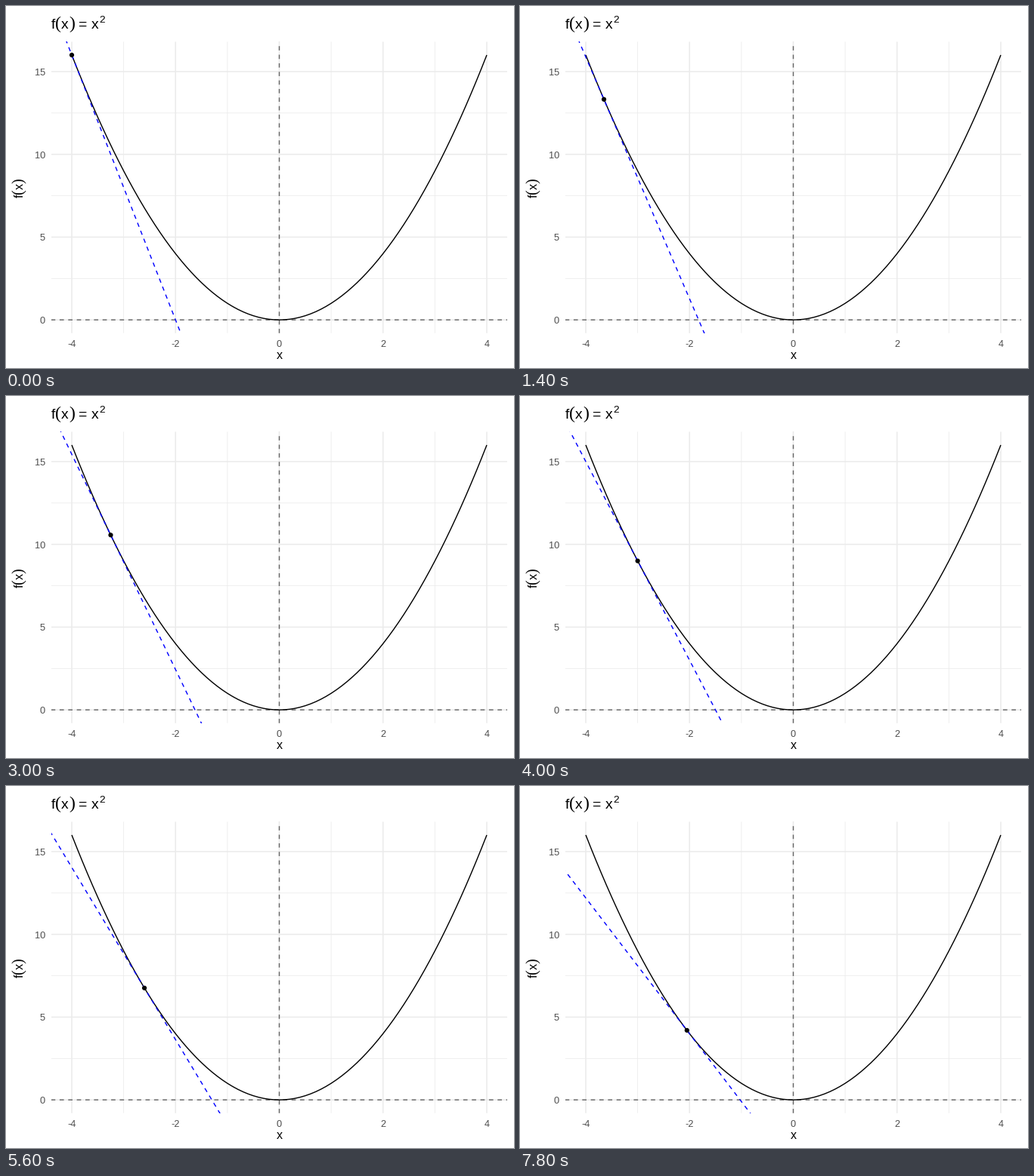
A matplotlib script for the animation above (8000 ms loop, 672 by 480 pixels).

```python
import numpy as np
import matplotlib.pyplot as plt
from matplotlib.animation import FuncAnimation
from matplotlib.patches import Circle, Rectangle

W, H, DPI = 672, 480, 96
PT = 72 / DPI                      # points per pixel
X0, Y0 = 361.5, 416.2              # pixel position of the origin
UX, UY = 68.62, 21.95              # pixels per unit
LINE = 1.42
DASH = (4, 4)

fig = plt.figure(figsize=(W / DPI, H / DPI), dpi=DPI, facecolor="white")
ax = fig.add_axes([0, 0, 1, 1])
ax.set_xlim(0, W)
ax.set_ylim(H, 0)
ax.axis("off")


def px(x):
    return X0 + UX * x


def py(y):
    return Y0 - UY * y


left, right = px(-4.4), px(4.4)
top, bottom = py(16.8), py(-0.8)
panel = Rectangle((left, top), right - left, bottom - top,
                  transform=ax.transData)


def stroke(xs, ys, color, width=LINE, style="-", z=1):
    line, = ax.plot(xs, ys, color=color, lw=width * PT, ls=style, zorder=z,
                    solid_capstyle="butt", dash_capstyle="butt", snap=False)
    line.set_clip_path(panel)
    return line


def label(x, y, s, size, color="black", font="Liberation Sans", **kw):
    kw.setdefault("va", "baseline")
    ax.text(x, y, s, fontsize=size * PT, color=color, family=font, **kw)


# Formula pieces: text, offset, rise and scale in ems, font
SANS, SERIF = "Liberation Sans", "Liberation Serif"
CALL = [("f", 0, 0, 1, SANS), ("(", 0.26, 0, 1.25, SERIF),
        ("x", 0.69, 0, 1, SANS), (")", 1.23, 0, 1.25, SERIF)]
SQUARE = [("=", 1.9, 0, 1, SANS), ("x", 2.79, 0, 1, SANS),
          ("2", 3.34, 0.44, 0.7, SANS)]


def formula(x, y, pieces, size, upright=True):
    for s, along, rise, scale, font in pieces:
        dx, dy = along * size, -rise * size
        if not upright:
            dx, dy = dy, -dx
        label(x + dx, y + dy, s, size * scale, font=font, ha="left",
              rotation=0 if upright else 90, rotation_mode="anchor")


# Grid
GRID = "#ebebeb"
for x in (-3, -1, 1, 3):
    stroke([px(x)] * 2, [bottom, top], GRID, 0.78)
for y in (2.5, 7.5, 12.5):
    stroke([left, right], [py(y)] * 2, GRID, 0.78)
for x in range(-4, 5, 2):
    stroke([px(x)] * 2, [bottom, top], GRID, 1.55)
    label(px(x), 452, str(x), 12.8, "#4d4d4d", ha="center")
for y in range(0, 16, 5):
    stroke([left, right], [py(y)] * 2, GRID, 1.55)
    label(52, py(y) + 5, str(y), 12.8, "#4d4d4d", ha="right")

# Zero lines and parabola
stroke([left, right], [Y0, Y0], "#666666", style=(0, DASH), z=2)
stroke([X0, X0], [bottom, top], "#666666", style=(0, DASH), z=2)
xs = np.linspace(-4, 4, 161)
stroke(px(xs), py(xs ** 2), "black", z=3)

formula(59.6, 30, CALL + SQUARE, 19.2)
formula(23, 254.5, CALL, 16, upright=False)
label(X0, 468, "x", 16, ha="center")

tangent = stroke([], [], "blue", style=(6.66, DASH), z=4)
dot = Circle((0, 0), 3.1, color="black", lw=0, zorder=5)
ax.add_patch(dot)


def update(i):
    tick = i if i < 2 else i // 2 * 2
    a = -4 + 0.025 * tick
    cx, cy = px(a), py(a * a)
    slope = -2 * a * UY / UX
    # The dashes run from where the line enters the stage
    edge = cy - slope * cx
    x, y = (cx - cy / slope, 0) if edge < 0 else (0, edge)
    tangent.set_data([x, x + (H - y) / slope], [y, H])
    dot.center = cx, cy
    return tangent, dot


anim = FuncAnimation(fig, update, frames=80, interval=100, repeat=True,
                     repeat_delay=0, init_func=lambda: update(0))
plt.show()
```
